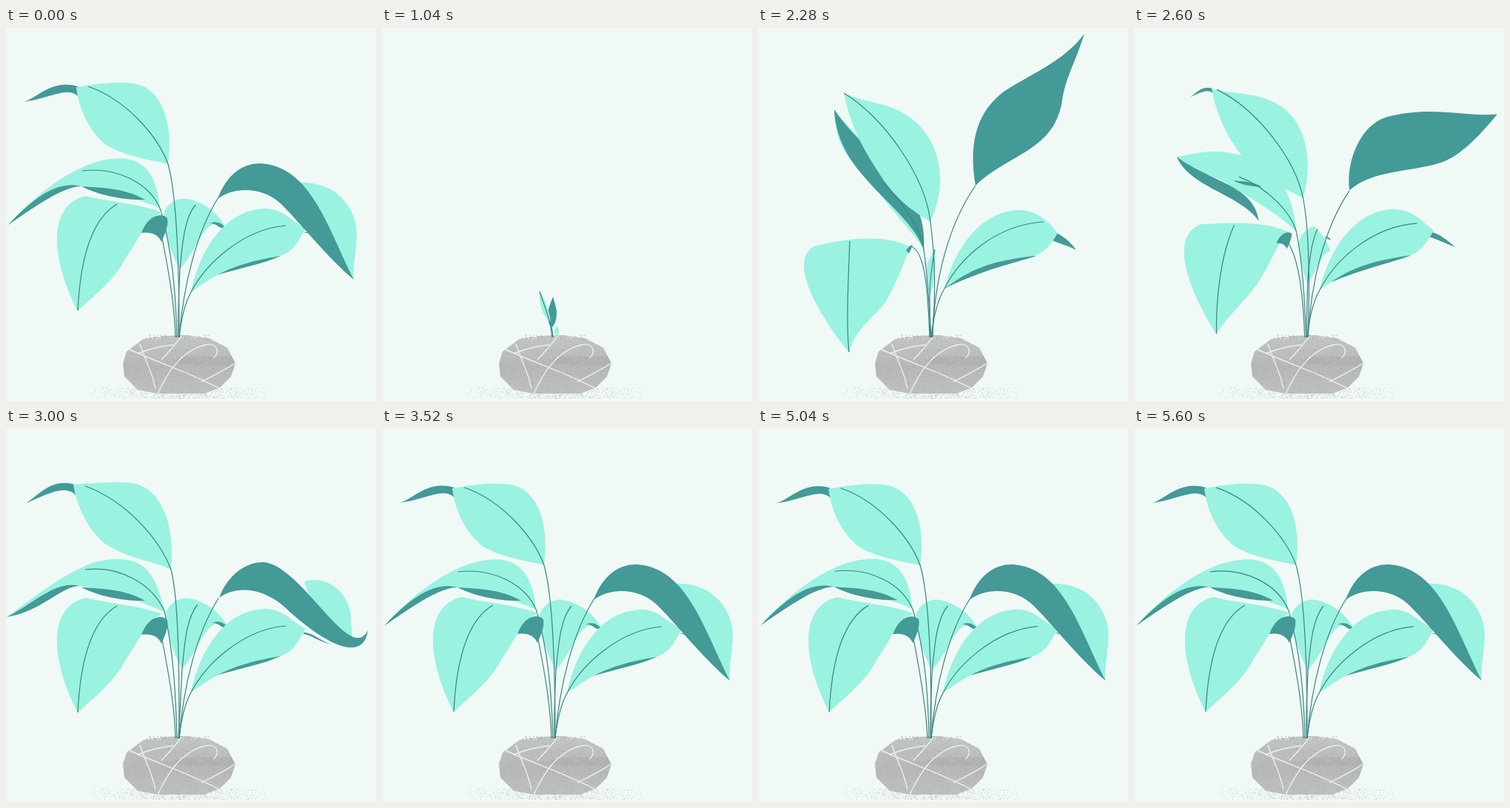
These frames come from a looping animation (500x504 px, 5.68 s). An HTML page with a canvas:

```html
<!DOCTYPE html>
<html lang="en">
<head>
<meta charset="utf-8">
<title>Growing plant</title>
<style>
html, body { margin: 0; width: 100%; height: 100%; overflow: hidden; background: #f0f9f5; }
canvas { display: block; }
</style>
</head>
<body>
<canvas id="stage" width="500" height="504"></canvas>
<script>
const ctx = document.getElementById('stage').getContext('2d');
const LOOP = 5680, LIGHT = '#9af2e0', DARK = '#439a97', BACK = '#f0f9f5';
const clamp = v => Math.max(0, Math.min(1, v));
const numbers = path => path.match(/[\d.]+/g).map(Number);

// A part morphs through poses keyed by time; a pose of one point is a collapsed shape.
function part(kind, rest, grown, extra = {}) {
  const poses = { 520: '232 418', 1040: '232 414', 2280: grown, 3000: rest, 3520: rest, ...extra };
  const keys = Object.keys(poses).map(Number);
  return { kind, rest, keys, poses: keys.map(k => numbers(poses[k])) };
}

// kick: offset while the leaves drop into place; drift: offset of the idle sway
const leaves = [
  { kick: [3, -2], drift: [1, 0], parts: [
    part('stem', 'M233 418C232 390 234 350 235 326', 'M233 418C232 400 232 380 232 362'),
    part('light',
      'M235 326C222 302 213 275 213 252C216 238 232 228 246 231C264 235 284 246 296 268C268 252 262 296 235 326',
      'M232 362C229 350 227 330 229 318C233 308 236 304 239 299C240 310 240 320 239 330C238 345 235 355 232 362',
      { 1040: 'M235 417C233 414 233 410 233 408C234 405 235 404 236 403C238 405 239 407 239 410C239 413 237 416 235 417' }),
    part('dark', 'M276 264C283 260 291 263 297 270C294 271 291 270 288 269C285 266 281 264 276 264', '239 300'),
    part('stem', 'M235 326C238 298 240 258 256 239', 'M232 362C232 340 235 320 239 299')
  ] },
  { kick: [0, 0], drift: [2, -2], parts: [
    part('light',
      'M208 244C190 235 150 222 102 214C70 208 40 240 3 266C35 232 70 200 116 183C188 160 204 200 208 244',
      'M224 298C204 270 180 246 160 218C128 180 106 170 103 110C112 125 125 132 145 160C180 190 222 220 224 298',
      { 3000: 'M215 248C196 238 150 222 100 212C70 206 40 238 1 254C35 230 70 200 116 181C188 162 202 196 215 248' }),
    part('dark', 'M3 266C40 226 72 206 102 214C78 214 44 238 3 266',
      'M103 110C106 200 204 240 224 300C232 212 150 180 103 110',
      { 3000: 'M1 254C38 236 66 204 100 212C74 212 50 246 1 254' }),
    part('dark', 'M102 214C130 216 160 216 188 232C160 233 125 226 102 214', '160 200'),
    part('stem', 'M231 418C229 350 224 300 209 246C195 210 150 187 103 193',
      'M234 418C231 370 229 330 224 300C224 280 200 240 170 210',
      { 3000: 'M231 418C229 350 226 300 214 246C198 210 154 184 107 190' })
  ] },
  { kick: [0, 1], drift: [-2, 1], parts: [
    part('stem', 'M229 418C228 375 220 330 211 284', 'M232 418C230 370 228 300 206 295'),
    part('light',
      'M212 249C188 258 184 280 162 310C150 336 126 356 97 382C66 324 50 240 108 227C144 236 176 236 214 250',
      'M206 296C196 320 185 350 170 374C150 396 132 408 123 438C98 408 34 318 76 295C108 286 170 276 206 296'),
    part('dark', 'M183 277C190 256 208 247 218 257C220 268 214 280 210 289C206 279 196 275 183 277',
      'M200 301C203 296 205 294 209 293C208 297 206 300 204 305C203 303 202 302 200 301'),
    part('stem', 'M97 382C100 320 112 260 150 238', 'M123 438C119 400 122 340 124 288')
  ] },
  { kick: [0, -1], drift: [0, -1], parts: [
    part('stem', 'M234 418C236 400 240 375 250 357', 'M234 418C236 400 240 372 252 352'),
    part('dark', 'M402 276C406 275 409 277 413 279C410 278 406 277 402 276',
      'M403 277C410 280 420 286 430 300C420 294 408 292 398 287',
      { 3000: 'M402 276C412 275 424 286 439 292C422 288 412 279 402 278' }),
    part('dark', 'M284 334C305 312 335 300 371 308C350 318 318 324 284 334',
      'M252 352C285 310 330 298 376 308C345 318 300 328 252 352'),
    part('light',
      'M250 357C282 335 300 320 370 308C390 302 396 286 405 270C385 262 378 246 352 244C296 244 262 300 250 357',
      'M252 352C290 325 310 316 372 308C388 304 396 292 405 277C392 262 380 247 352 246C300 248 266 298 252 352'),
    part('stem', 'M250 357C270 318 320 272 378 267', 'M252 352C272 312 320 266 386 262')
  ] },
  { kick: [0, 0], drift: [-1, 0], parts: [
    part('stem', 'M234 418C240 345 258 275 287 229', 'M236 418C238 340 258 264 294 213',
      { 1040: 'M231 418C231 412 230 408 229 404' }),
    part('light', 'M393 209C430 206 462 225 472 262C478 290 468 312 470 340C440 310 410 262 393 209', '385 60',
      { 1040: '231 380', 2640: '430 128',
        3000: 'M403 206C430 198 458 215 465 246C468 262 466 280 470 290C440 285 415 245 403 206' }),
    part('dark',
      'M286 231C298 198 320 182 345 183C412 188 434 268 470 340C432 308 402 268 374 240C352 216 310 212 286 231',
      'M294 213C286 165 290 118 332 86C372 60 412 46 441 8C426 54 416 66 411 98C401 166 338 170 294 213',
      { 1040: 'M229 405C223 397 223 388 225 380C227 373 229 368 231 363C233 370 235 376 236 383C236 392 235 400 229 405',
        2640: 'M291 220C286 180 310 130 345 124C410 110 450 130 497 130C470 160 440 190 410 194C370 198 320 195 291 220',
        3000: 'M288 228C300 196 326 179 348 180C400 184 465 320 489 272C484 312 440 300 376 240C348 216 314 210 288 228' })
  ] },
  { kick: [0, 0], drift: [1, 2], parts: [
    part('dark', 'M22 100C40 98 60 68 97 79C100 83 99 88 97 92C82 78 58 96 22 100', '116 87',
      { 1040: '213 356', 3000: 'M26 101C44 90 60 66 93 75C97 79 97 86 95 90C80 74 56 88 26 101' }),
    part('light',
      'M219 184C204 179 167 176 137 159C114 142 98 110 95 80C113 77 144 71 172 75C210 80 227 128 219 184',
      'M233 262C215 250 190 237 166 200C146 168 126 140 116 87C140 102 180 98 212 126C250 160 255 215 233 262',
      { 1040: 'M227 399C225 396 217 386 215 377C212 366 213 362 213 356C217 362 221 368 223 376C226 386 229 394 227 399',
        3000: 'M223 190C206 180 166 176 134 155C112 138 96 106 91 75C110 74 142 70 170 73C208 78 230 128 223 190' }),
    part('stem', 'M234 418C234 340 232 230 219 184C206 148 164 97 111 79',
      'M235 418C242 350 238 300 233 262C226 200 170 120 116 88',
      { 1040: 'M230 418C229 412 228 404 227 399C224 386 217 368 213 356',
        3000: 'M234 418C234 340 234 232 223 190C208 150 164 98 107 77' })
  ] }
];

function drawPart(p, t, [dx, dy]) {
  let i = 0;
  while (i < p.keys.length - 2 && t >= p.keys[i + 1]) i++;
  let u = clamp((t - p.keys[i]) / (p.keys[i + 1] - p.keys[i]));
  if (p.keys[i] === 3000) u = 1 - (1 - u) ** 3;
  const a = p.poses[i], b = p.poses[i + 1];
  const at = n => {
    const from = a[n % a.length], to = b[n % b.length];
    return from + (to - from) * u;
  };
  let n = 0;
  const shape = new Path2D(p.rest.replace(/[\d.]+/g, () => {
    const weight = clamp((418 - at(n | 1)) / 30);
    const v = at(n) + (n % 2 ? dy : dx) * weight;
    n++;
    return v.toFixed(2) + ' ';
  }));
  if (p.kind === 'stem') {
    ctx.strokeStyle = '#3a8585';
    ctx.lineWidth = 1.2;
    ctx.stroke(shape);
  } else {
    ctx.fillStyle = p.kind === 'dark' ? DARK : LIGHT;
    ctx.fill(shape);
  }
}

// The stone never moves, so it is painted once.
const ground = document.createElement('canvas');
ground.width = 500;
ground.height = 504;
(function paintStone() {
  const g = ground.getContext('2d');
  let seed = 7;
  const rnd = () => (seed = seed * 16807 % 2147483647) / 2147483647;
  const speck = (x, y, color) => {
    g.fillStyle = color;
    g.fillRect(x | 0, y | 0, 1, 1);
  };
  g.fillStyle = BACK;
  g.fillRect(0, 0, 500, 504);
  for (let i = 0; i < 800; i++) {
    const spread = rnd() + rnd() - 1;
    speck(234 + spread * 126, 486 + rnd() * 15, `rgba(165,170,168,${0.2 + rnd() * 0.35})`);
  }

  const stone = new Path2D('M158 453L163 437 186 420 212 416 246 415 274 419 299 432 310 453 304 471 289 486 268 494 205 494 178 489 160 471Z');
  const shade = g.createLinearGradient(0, 415, 0, 495);
  shade.addColorStop(0, '#c3c4c4');
  shade.addColorStop(0.55, '#b6b7b7');
  shade.addColorStop(1, '#bfc0c0');
  g.fillStyle = shade;
  g.fill(stone);
  g.save();
  g.clip(stone);
  g.fillStyle = 'rgba(145,147,147,.2)';
  g.fill(new Path2D('M225 450C250 438 280 447 310 442V458C280 452 250 460 225 450'));
  for (let i = 0; i < 2600; i++) {
    const c = rnd() < 0.5 ? '225,225,225' : '140,140,140';
    speck(157 + rnd() * 154, 414 + rnd() * 82, `rgba(${c},.18)`);
  }
  for (let i = 0; i < 14; i++) speck(165 + rnd() * 130, 418 + rnd() * 70, '#58a9a2');
  g.strokeStyle = 'rgba(245,248,247,.85)';
  g.lineWidth = 1.4;
  g.stroke(new Path2D('M166 434C205 452 255 468 292 489M181 427C188 448 198 466 202 487M178 440C198 432 212 430 226 428M205 494C218 466 236 436 270 428C286 424 290 440 280 446M237 417C229 427 220 438 210 448M264 478C280 470 296 462 311 452'));
  g.restore();
  for (let i = 0; i < 60; i++) speck(190 + rnd() * 85, 415 + rnd() * 5, i % 2 ? BACK : '#a5a8a7');
})();

function draw(now) {
  const time = Math.floor(now % LOOP / 40) * 40;
  ctx.drawImage(ground, 0, 0);
  if (time < 80 || time >= 520) {
    const t = time < 80 ? 3520 : time;
    const kick = t < 3000 ? clamp((t - 2280) / 720) : (1 - clamp((t - 3000) / 520)) ** 3;
    const drift = t > 3520 ? Math.sin(Math.PI * (t - 3520) / 1920) ** 2 : 0;
    for (const leaf of leaves) {
      const shift = [0, 1].map(i => leaf.kick[i] * kick + leaf.drift[i] * drift);
      for (const p of leaf.parts) drawPart(p, t, shift);
    }
  }
  requestAnimationFrame(loop);
}

const start = performance.now();
function loop() {
  draw(performance.now() - start);
}
loop();
</script>
</body>
</html>
```
